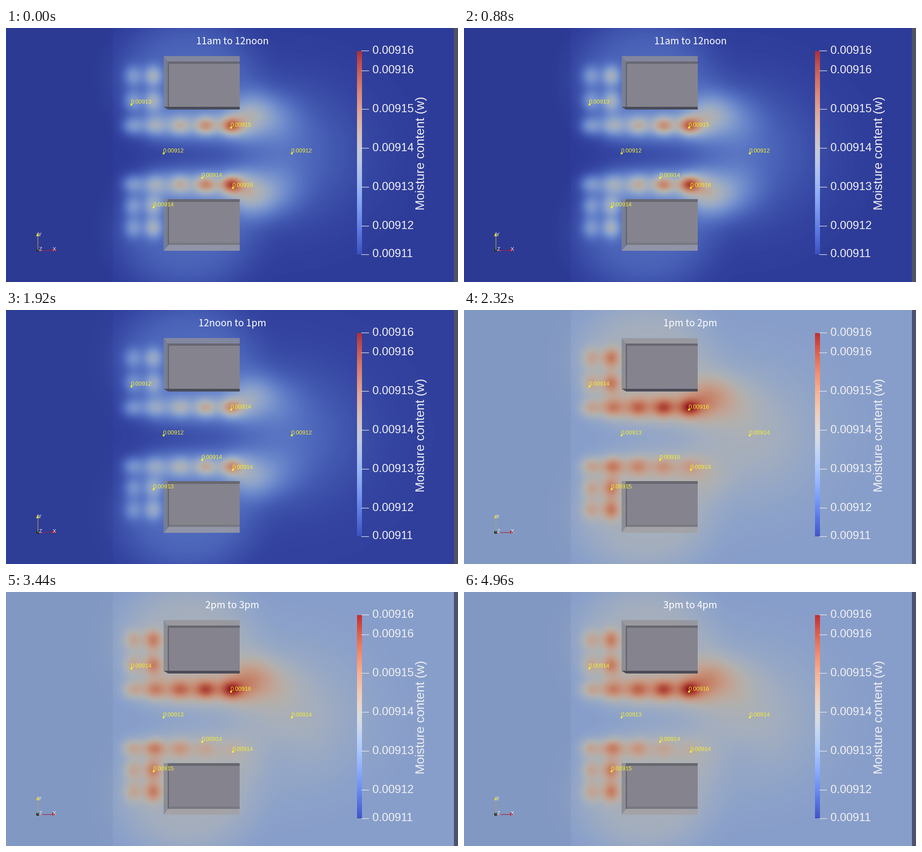
Animation of 998 by 561 pixels, one loop 5.04 s. Source, as a matplotlib script:

```python
import numpy as np
import matplotlib.pyplot as plt
from matplotlib.animation import FuncAnimation
from matplotlib.patches import Polygon, Rectangle

W, H = 998, 561
FRAMES, STEP = 63, 80
PHASES = 5
SANS = "Liberation Sans"
WHITE, YELLOW = "#f0f0f2", "#f5ee30"

TITLES = ["11am to 12noon", "12noon to 1pm", "1pm to 2pm", "2pm to 3pm", "3pm to 4pm"]

# Sensor position and the last digit of its reading in each phase
PROBES = [
    (277, 169, "32444"),
    (497, 220, "54666"),
    (348, 277, "22333"),
    (631, 277, "22444"),
    (433, 331, "44544"),
    (501, 353, "64444"),
    (326, 396, "43555"),
]

# Background, then the rise above it: outer and inner column, end of each row
MORNING = dict(base=0.0, outer=0.30, inner=0.44, top=0.84, bottom=0.90)
NOON = dict(base=0.01, outer=0.26, inner=0.38, top=0.69, bottom=0.69)
EARLY = dict(base=0.33, outer=0.27, inner=0.42, top=0.66, bottom=0.31)
LATE = dict(base=0.33, outer=0.26, inner=0.41, top=0.66, bottom=0.21)
HOURS = [MORNING, NOON, EARLY, LATE, LATE]


def bell(x, y, cx, cy, sx, sy, power=1):
    r2 = 0.5 * (((x - cx) / sx) ** 2 + ((y - cy) / sy) ** 2)
    return np.exp(-r2 ** power)


def ramp_up(d, soft):
    return 0.5 + 0.5 * np.tanh(d / soft)


def sources(hour):
    """Each source as a bell (x, y, radius x, radius y) and its level."""
    outer, inner = hour["outer"], hour["inner"]
    out = []
    for row_y, side, end in [(216, -1, hour["top"]), (345, 1, hour["bottom"])]:
        for k in (1, 2):
            y = row_y + side * (55 if side < 0 else 48) * k
            out += [((281, y, 14, 16), outer), ((325, y, 14, 16), inner)]
        out.append(((280, row_y, 16, 14), outer))
        # Levels grow or decay by a constant ratio along the row
        for x, level in zip(np.linspace(328, 497, 4), np.geomspace(inner, end, 4)):
            out.append(((x, row_y, 17, 14), level))
        out.append(((545, 280 + side * 88, 36, 33), 0.58 * end))
        out.append(((602, 280 + side * 76, 40, 40), 0.34 * end))
    return out


def spread(x, y, hour):
    """Soft moisture around the blocks, along the rows and to the right."""
    along = ramp_up(x - 305, 32) * ramp_up(545 - x, 22)
    halos = sum(bell(x, y, 400, cy, 108, 94, power=2) for cy in (112, 448))
    rows = (hour["top"] * bell(0, y, 0, 214, 1, 26)
            + hour["bottom"] * bell(0, y, 0, 347, 1, 26))
    return 0.12 * halos + 0.22 * along * rows + 0.13 * bell(x, y, 620, 275, 110, 100)


def make_field(hour):
    """Add a bell at each source so that the field meets its level there."""
    spots, levels = zip(*sources(hour))
    px, py = np.array(spots)[:, :2].T
    kernel = np.stack([bell(px, py, *s) for s in spots], axis=1)
    amps = np.linalg.solve(kernel, np.array(levels) - spread(px, py, hour))
    y, x = np.mgrid[0:H, 0:W] + 0.5
    v = hour["base"] + spread(x, y, hour)
    for amp, spot in zip(amps, spots):
        v = v + amp * bell(x, y, *spot)
    shade = np.where(x < 236, 0.77, 0.8)[..., None]
    return plt.cm.coolwarm(np.clip(v, 0, 1))[..., :3] * shade


def rgb(*c):
    return tuple(v / 255 for v in c)


def rect(x0, y0, x1, y1, color, alpha=1):
    patch = Rectangle((x0, y0), x1 - x0, y1 - y0, fc=color, ec="none", alpha=alpha)
    return ax.add_patch(patch)


def poly(points, color, alpha=1):
    return ax.add_patch(Polygon(points, fc=color, ec="none", alpha=alpha))


def line(x0, y0, x1, y1, color, width):
    ax.plot([x0, x1], [y0, y1], color=color, lw=width * 0.72, solid_capstyle="butt")


def label(x, y, s, px, color=WHITE, ha="left", font=SANS, **kw):
    return ax.text(x, y, s, fontsize=px * 0.72, color=color, ha=ha, va="baseline",
                   family=font, **kw)


def draw_buildings():
    roof, seam = rgb(133, 132, 142), rgb(103, 103, 112)
    wall, side = rgb(149, 147, 150), rgb(132, 132, 137)
    # Upper block
    poly([(348, 62), (516, 62), (516, 74), (357, 74)], wall, 0.75)
    poly([(348, 62), (357, 74), (357, 174), (348, 175)], side, 0.75)
    rect(357, 74, 516, 79, seam)
    rect(357, 74, 360, 175, seam)
    rect(360, 79, 516, 174, roof)
    poly([(348, 174), (516, 174), (516, 180), (358, 180)], rgb(74, 75, 88))
    # Lower block
    poly([(348, 378), (358, 378), (358, 479), (348, 492)], side, 0.75)
    poly([(348, 492), (359, 479), (516, 479), (516, 492)], rgb(163, 161, 163), 0.8)
    rect(357, 378, 516, 384, seam)
    rect(357, 378, 360, 479, seam)
    rect(360, 384, 516, 474, roof)
    rect(360, 474, 516, 479, rgb(120, 120, 129))


def draw_scale():
    ramp = np.linspace(0.96, 0.02, 256)[:, None]
    bar = ax.imshow(ramp, cmap="coolwarm", vmin=0, vmax=1,
                    extent=(775, 786, 500, 51), aspect="auto", zorder=2)
    inner = np.linspace(93.5, 437, 5)
    for y, end in zip([50, *inner, 499.5], [16, 16, 15, 14, 13, 12, 11]):
        line(784, y, 801, y, WHITE, 1.2)
        label(809, y + 6.5, f"0.009{end}", 25.3)
    label(924, 402, "Moisture content (w)", 27.8, rotation=90, rotation_mode="anchor")
    return bar


def draw_axes_marker():
    line(70, 460, 70, 491, rgb(170, 165, 95), 1.3)
    line(70, 490.5, 103, 490.5, rgb(160, 35, 60), 1.3)
    poly([(70, 451), (66.5, 460), (73.5, 460)], rgb(225, 210, 70))
    poly([(110, 490.5), (102, 487), (102, 494)], rgb(185, 25, 40))
    rect(67, 488, 73, 494, rgb(30, 50, 35))
    for x, y, s in [(75, 460, "Y"), (76, 491.5, "Z"), (107, 492, "X")]:
        label(x, y, s, 11.5, ha="center")


fields = [make_field(hour) for hour in HOURS]

fig = plt.figure(figsize=(W / 100, H / 100), dpi=100)
ax = fig.add_axes([0, 0, 1, 1])
ax.axis("off")

field = ax.imshow(fields[0], extent=(0, W, H, 0), aspect="auto", zorder=0)
draw_buildings()
scale_bar = draw_scale()
draw_axes_marker()
strip = rect(989.5, 0, W, H, rgb(80, 83, 100))
title = label(500, 36, "", 21.1, color="white", ha="center", font="Noto Sans CJK JP")
readings = []
for x, y, _ in PROBES:
    rect(x - 2, y - 2, x + 2, y + 2, YELLOW)
    readings.append(label(x - 1, y - 2, "", 12.8, color=YELLOW))

ax.set_xlim(0, W)
ax.set_ylim(H, 0)


def update(i):
    phase = i * PHASES // FRAMES
    dark = HOURS[phase]["base"] < 0.1
    field.set_data(fields[phase])
    scale_bar.set_alpha(0.88 if dark else 1)
    strip.set_facecolor(rgb(80, 83, 100) if dark else rgb(76, 82, 110))
    title.set_text(TITLES[phase])
    for text, (_, _, digits) in zip(readings, PROBES):
        text.set_text("0.0091" + digits[phase])
    return [field, scale_bar, strip, title, *readings]


anim = FuncAnimation(fig, update, frames=FRAMES, interval=STEP, repeat=True,
                     repeat_delay=0, init_func=lambda: update(0))
plt.show()
```
